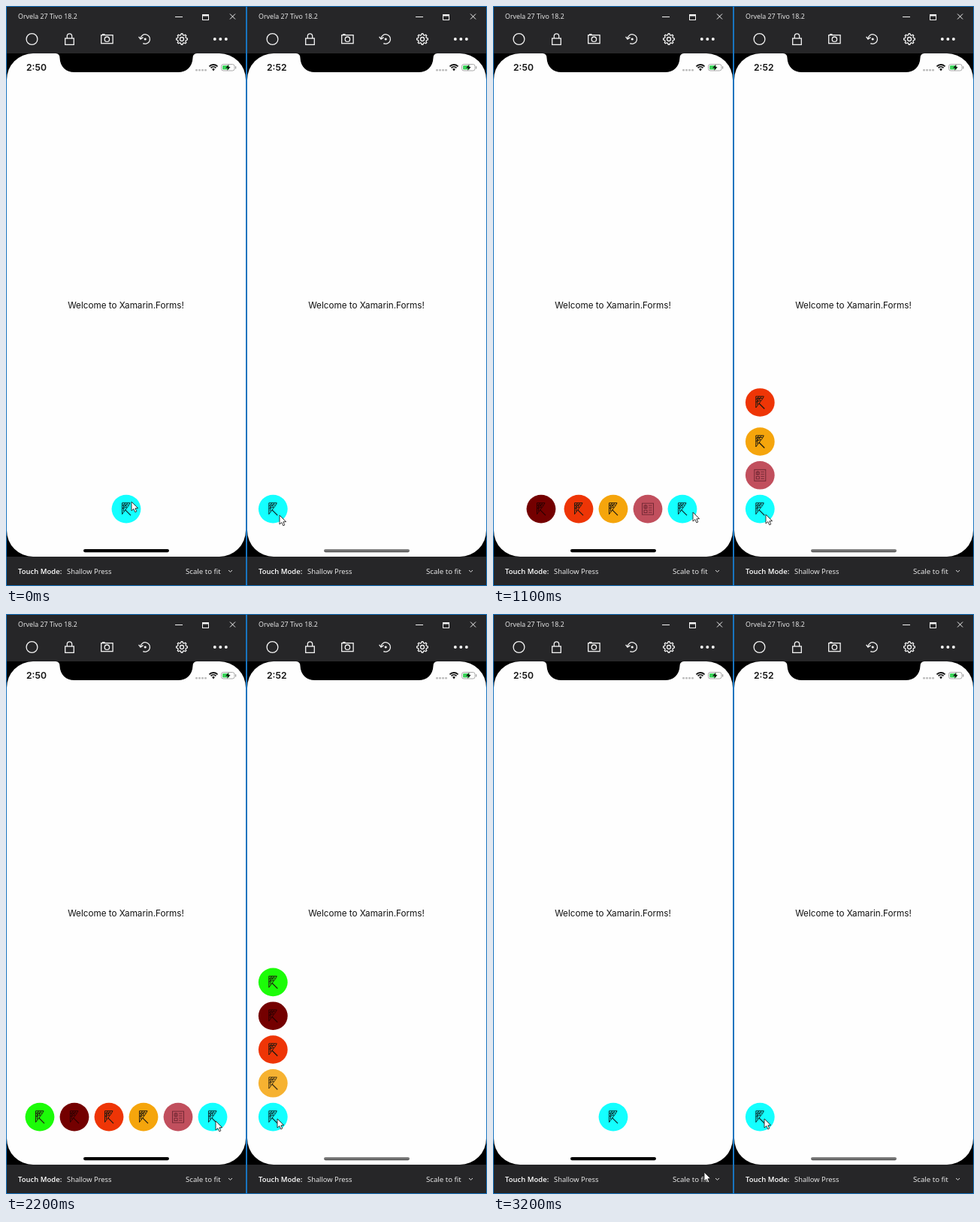
These frames come from a looping animation (640 px wide and 771 px high, 3.3 s). An HTML page with a canvas:

```html
<!DOCTYPE html>
<html lang="en">
<head>
<meta charset="utf-8">
<title>Expanding button menu</title>
<style>
html, body { margin: 0; width: 100%; height: 100%; overflow: hidden; background: #262628; }
canvas { display: block; }
</style>
</head>
<body>
<canvas id="stage" width="640" height="771"></canvas>
<script>
const ctx = document.getElementById('stage').getContext('2d');
const LOOP = 3300, STEP = 100;
const BAR = '#262628', BLUE = '#1874bf', CYAN = '#14ffff';
// in order of appearance
const ITEMS = ['#c14f5d', '#f5a50c', '#ee3506', '#740000', '#1cfc08'];
const UI = '"Open Sans", sans-serif', PHONE = 'Inter, sans-serif';

const PANELS = [
  { x: 0, clock: '2:50', row: true, open: 125, openStep: 300, close: 2367, closeStep: 150,
    cursor: [[0, 167, 659], [600, 167, 659], [1000, 266, 673], [1100, 266, 673], [1500, 272, 671],
             [2000, 279, 674], [2300, 279, 674], [2600, 282, 739], [3200, 281, 742]] },
  { x: 320, clock: '2:52', row: false, open: 470, openStep: 257, close: 2026, closeStep: 151,
    cursor: [[0, 44, 677], [500, 43, 676], [1100, 43, 676], [1500, 42, 674], [2000, 41, 671], [3200, 41, 671]] }
];

function text(s, x, y, font, color, align = 'left') {
  ctx.font = font;
  ctx.fillStyle = color;
  ctx.textAlign = align;
  ctx.fillText(s, x, y);
}

function line(...p) {
  ctx.beginPath();
  for (let i = 0; i < p.length; i += 2) ctx.lineTo(p[i], p[i + 1]);
  ctx.stroke();
}

function ring(x, y, r, from = 0, to = Math.PI * 2) {
  ctx.beginPath();
  ctx.arc(x, y, r, from, to);
  ctx.stroke();
}

function dot(x, y, rx, ry = rx) {
  ctx.beginPath();
  ctx.ellipse(x, y, rx, ry, 0, 0, Math.PI * 2);
  ctx.fill();
}

function pill(x, y, w, h, r) {
  ctx.beginPath();
  ctx.roundRect(x, y, w, h, r);
  ctx.fill();
}

function titleBar() {
  text('Orvela 27 Tivo 18.2', 16, 17, '8.9px ' + UI, '#f2f2f2');
  ctx.strokeStyle = ctx.fillStyle = '#f4f4f4';
  ctx.lineWidth = 1;
  line(225, 14.5, 235, 14.5);
  ctx.strokeRect(261.5, 11.5, 8, 7);
  ctx.fillRect(261, 11, 9, 2.5);
  line(298, 10.5, 305, 17.5);
  line(305, 10.5, 298, 17.5);
}

function gear(x, y) {
  ctx.beginPath();
  for (let i = 0; i < 32; i++) {
    const r = i % 4 < 2 ? 7.4 : 5.6, a = (i - 0.5) * Math.PI / 16;
    ctx.lineTo(x + r * Math.cos(a), y + r * Math.sin(a));
  }
  ctx.closePath();
  ctx.stroke();
  ring(x, y, 2.5);
}

function toolBar() {
  ctx.strokeStyle = ctx.fillStyle = '#f4f4f4';
  ctx.lineWidth = 1.3;
  ring(34.5, 44, 7.4);
  ctx.strokeRect(78.7, 43, 11.6, 8.4);
  ctx.beginPath();
  ctx.moveTo(81.3, 43);
  ctx.lineTo(81.3, 40);
  ctx.arc(84.5, 40, 3.2, Math.PI, 0);
  ctx.lineTo(87.7, 43);
  ctx.stroke();
  ctx.strokeRect(126.7, 38.7, 15.4, 11);
  ring(134.4, 44.2, 3.2);
  ctx.fillRect(128, 37, 3.5, 2);
  ring(185.2, 44, 6.3, -Math.PI * 0.95, Math.PI * 0.65);
  line(176.6, 40.8, 179, 44, 182.5, 41.6);
  dot(185.2, 44, 1.6);
  gear(234, 44);
  for (const x of [277.8, 285.3, 292.8]) dot(x, 44, 2);
}

function statusIcons() {
  ctx.fillStyle = '#bcbcbc';
  for (let i = 0; i < 4; i++) pill(252 + i * 4, 84, 3, 2.5, 1);
  ctx.strokeStyle = ctx.fillStyle = '#111';
  ctx.lineWidth = 1.8;
  for (const r of [7.6, 4.7]) ring(276, 85.6, r, -Math.PI * 0.76, -Math.PI * 0.24);
  ctx.beginPath();
  ctx.moveTo(276, 86.4);
  ctx.arc(276, 85.6, 2.5, -Math.PI * 0.76, -Math.PI * 0.24);
  ctx.fill();
  ctx.strokeStyle = '#a9a9a9';
  ctx.lineWidth = 1;
  ctx.beginPath();
  ctx.roundRect(286.5, 77.5, 17.5, 8.5, 2.6);
  ctx.stroke();
  ctx.fillStyle = '#a9a9a9';
  pill(305, 80, 1.3, 3.5, 0.6);
  ctx.fillStyle = '#3bd45a';
  pill(288, 79, 9, 5.6, 1.3);
  ctx.fillStyle = '#111';
  ctx.beginPath();
  for (const [x, y] of [[296.5, 77.6], [292, 82.4], [295, 82.4], [294, 86], [298.6, 81], [295.6, 81]]) ctx.lineTo(x, y);
  ctx.fill();
}

function screen(p) {
  ctx.fillStyle = '#000';
  ctx.fillRect(1, 63, 318, 669);
  ctx.fillStyle = '#fefefe';
  pill(1, 63, 318, 669, 35);
  ctx.fillStyle = '#000';
  ctx.beginPath();
  ctx.moveTo(66, 63);
  ctx.quadraticCurveTo(71.5, 63.5, 71.5, 69);
  ctx.bezierCurveTo(72, 81, 80, 88, 91, 88);
  ctx.lineTo(229, 88);
  ctx.bezierCurveTo(240, 88, 248, 81, 248.5, 69);
  ctx.quadraticCurveTo(248.5, 63.5, 254, 63);
  ctx.fill();
  text(p.clock, 27, 86, '600 12.2px ' + PHONE, '#111');
  statusIcons();
  text('Welcome to Xamarin.Forms!', 159.5, 401.5, '11.7px ' + PHONE, '#111', 'center');
  if (p.row) ctx.fillStyle = '#000';
  else {
    const g = ctx.createLinearGradient(0, 722, 0, 726.5);
    g.addColorStop(0, '#8c8c8c');
    g.addColorStop(1, '#505050');
    ctx.fillStyle = g;
  }
  pill(103, 722, 114, 4.2, 2.1);
}

function footer() {
  text('Touch Mode:', 16, 755, '600 9.5px ' + UI, '#fff');
  text('Shallow Press', 81, 755, '9.4px ' + UI, '#f2f2f2');
  text('Scale to fit', 239, 755, '9.7px ' + UI, '#f2f2f2');
  ctx.strokeStyle = '#ddd';
  ctx.lineWidth = 1;
  line(296, 750, 298.5, 752.3, 301, 750);
}

function flagIcon() {
  ctx.lineWidth = 1;
  line(-5.5, 7, -5.5, -8, 5, -8, 3.5, -5, -5.5, 7);
  line(-3.5, 3, -3.5, -5.5, 3, -5.5);
  line(-5.5, -4, -1, -8);
  line(-5.5, 0, 2, -8);
  line(-3.5, -1, 0.5, -2.5, -1, -5);
  ctx.lineWidth = 1.3;
  line(-1.5, 1, 6, 8.5);
}

function listIcon() {
  ctx.lineWidth = 0.9;
  ctx.strokeRect(-7.5, -7.5, 15, 15);
  ctx.strokeRect(-5, -4.5, 4, 3.5);
  ctx.strokeRect(-5, 1.5, 4, 3.5);
  for (const y of [-4.5, -1.5, 1.5, 4.5]) line(1, y, 5.5, y);
  line(-3, -6, -3, 0);
}

function button(x, y, color, alpha, icon, tint) {
  ctx.save();
  ctx.translate(x, y);
  ctx.globalAlpha = alpha;
  ctx.fillStyle = color;
  dot(0, 0, 19.4, 18.8);
  ctx.strokeStyle = tint;
  icon();
  ctx.restore();
}

function menu(p, t) {
  const shown = [];
  ITEMS.forEach((color, i) => {
    const a = (t - p.open - i * p.openStep) / p.openStep;
    const b = (t - p.close - i * p.closeStep) / p.closeStep;
    if (a < 0 || b >= 1) return;
    const nudge = a < 1 ? -8 * (1 - Math.abs(2 * a - 1)) : 0;
    shown.push({ color, nudge, alpha: 1 - Math.max(0, b), list: i === 0, dark: i === 3 });
  });
  const n = shown.length;
  const end = p.row ? 160 + n * 23 : 35.3;
  shown.forEach((s, i) => {
    const x = p.row ? end - (i + 1) * 46 + s.nudge : end;
    const y = p.row ? 668.6 : 668.6 - (i + 1) * 44.8 + s.nudge;
    const tint = s.list ? '#6b2530' : s.dark ? '#2c0000' : '#201a10';
    button(x, y, s.color, s.alpha, s.list ? listIcon : flagIcon, tint);
  });
  button(end, 668.6, CYAN, 1, flagIcon, '#0b2a2c');
}

function pathAt(keys, t) {
  let k = 0;
  while (k < keys.length - 2 && t >= keys[k + 1][0]) k++;
  const [t0, x0, y0] = keys[k], [t1, x1, y1] = keys[k + 1];
  const f = Math.min(1, (t - t0) / (t1 - t0));
  return [x0 + (x1 - x0) * f, y0 + (y1 - y0) * f];
}

function cursor(x, y) {
  ctx.save();
  ctx.translate(x, y);
  ctx.beginPath();
  for (const [px, py] of [[0, 0], [0, 12], [2.8, 9.5], [4.8, 13.8], [6.8, 12.9], [4.9, 8.8], [8.6, 8.6]]) ctx.lineTo(px, py);
  ctx.closePath();
  ctx.fillStyle = '#fff';
  ctx.fill();
  ctx.strokeStyle = '#222';
  ctx.lineWidth = 0.9;
  ctx.stroke();
  ctx.restore();
}

function panel(p, t) {
  ctx.save();
  ctx.translate(p.x, 0);
  ctx.fillStyle = BAR;
  ctx.fillRect(0, 0, 320, 771);
  titleBar();
  toolBar();
  screen(p);
  footer();
  ctx.strokeStyle = BLUE;
  ctx.lineWidth = 1;
  ctx.strokeRect(0.5, 0.5, 319, 770);
  menu(p, t);
  cursor(...pathAt(p.cursor, t));
  ctx.restore();
}

const start = performance.now();
function frame() {
  const t = Math.floor((performance.now() - start) % LOOP / STEP) * STEP;
  for (const p of PANELS) panel(p, t);
  requestAnimationFrame(frame);
}
frame();
</script>
</body>
</html>
```
